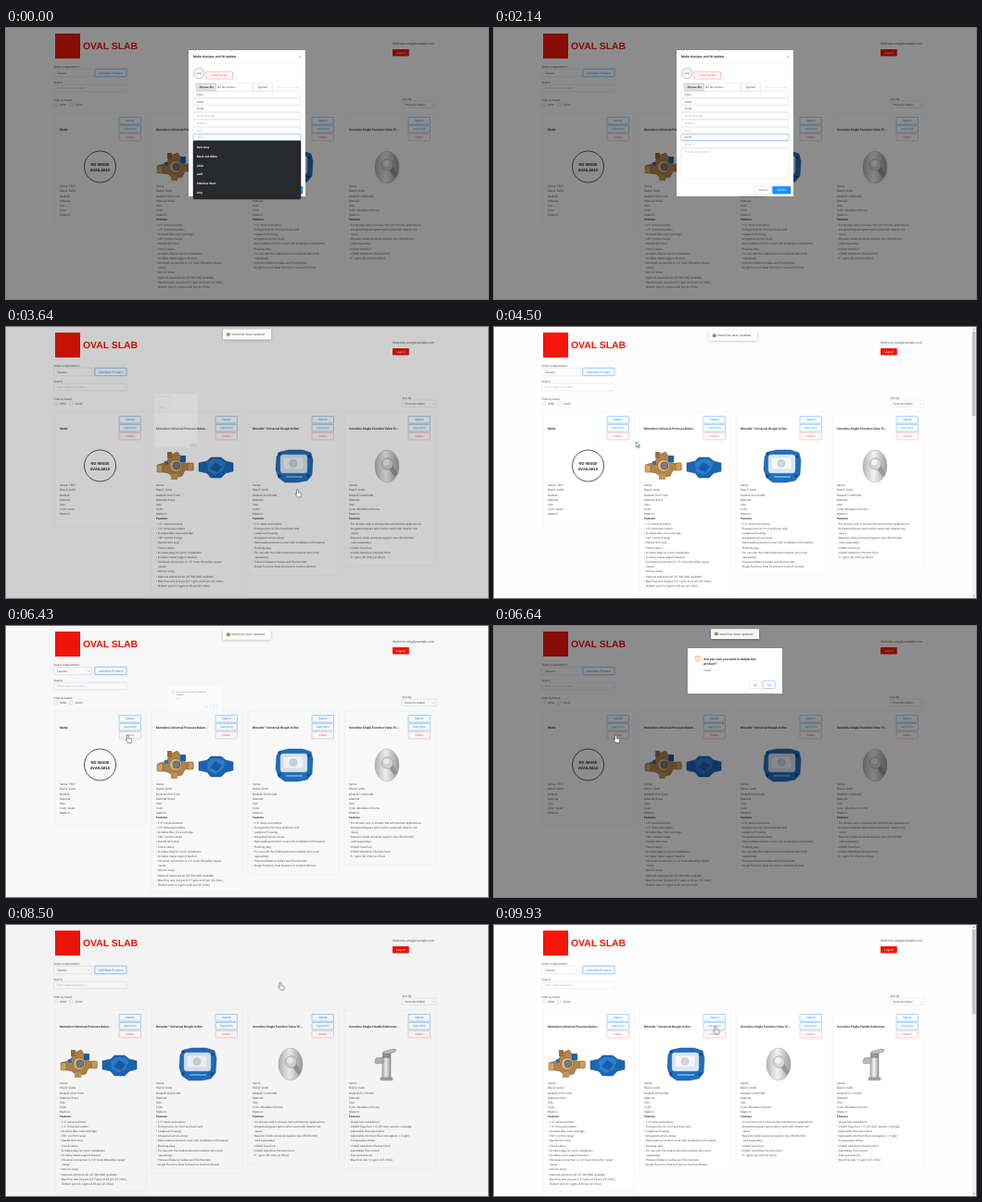
An HTML page for the animation above (10 s loop, 520 by 293 pixels).

```html
<!DOCTYPE html>
<html lang="en">
<head>
<meta charset="utf-8">
<title>Product admin</title>
<style>
html, body { margin: 0; width: 100%; height: 100%; overflow: hidden; background: #fff; }
svg { display: block; width: 100vw; height: 100vh; }
text { font: 3.05px Roboto, sans-serif; fill: #555; text-rendering: geometricPrecision; white-space: pre; }
.b { font-weight: 700; fill: #333; }
.m { font-size: 3.4px; }
.mid { text-anchor: middle; }
.hint { fill: #b5b5b5; }
.blue { fill: #1890ff; }
.red { fill: #ff4d4f; }
.white { fill: #fff; }
.logo { font: 700 10.4px "Liberation Sans", Arial, sans-serif; fill: #f5150a; }

.anim { animation: 10s linear infinite; }
.step { animation: 10s step-end infinite; }
.mask { animation-name: mask; }
.edit { animation-name: edit; transform-origin: 139.6px 100.5px; }
.confirm { animation-name: confirm; transform-origin: 127px 120px; }
.toast { animation-name: toast; }
.shift { animation-name: shift; }
.scroll { animation-name: scroll; }
.strip { animation-name: strip; }
.first { animation-name: first; }
.saved { animation-name: saved; }
.typed { animation-name: typed; }
.empty { animation-name: empty; }
.all { animation-name: all; }
.some { animation-name: some; }
.cursor { animation-name: cursor; }
.shown { animation-name: shown; }
.arrow { animation-name: arrow; }
.hand { animation-name: hand; }

@keyframes mask {
  0%, 35.24% { opacity: 1; } 37.24%, 64.18% { opacity: 0; }
  66.18%, 83.2% { opacity: 1; } 85.2%, 100% { opacity: 0; }
}
@keyframes edit {
  0%, 35.24% { opacity: 1; transform: scale(1); animation-timing-function: cubic-bezier(.78,.14,.15,.86); }
  37.24%, 100% { opacity: 0; transform: scale(.2); }
}
@keyframes confirm {
  0%, 64.18% { opacity: 0; transform: scale(.2); animation-timing-function: cubic-bezier(.08,.82,.17,1); }
  66.18%, 83.2% { opacity: 1; transform: scale(1); animation-timing-function: cubic-bezier(.78,.14,.15,.86); }
  85.2%, 100% { opacity: 0; transform: scale(.2); }
}
@keyframes toast {
  0%, 34.8% { opacity: 0; transform: translateY(-10px); animation-timing-function: ease-out; }
  37.1%, 66% { opacity: 1; transform: none; animation-timing-function: ease-in; }
  68%, 100% { opacity: 0; transform: translateY(-10px); }
}
@keyframes shift { 0% { transform: none; } 37.24% { transform: translateX(-2px); } 64.18%, 100% { transform: none; } }
@keyframes scroll { 0% { opacity: 0; } 37.24% { opacity: 1; } 64.18% { opacity: 0; } 85.2%, 100% { opacity: 1; } }
@keyframes strip { 0% { transform: none; } 82.9%, 100% { transform: translateX(-104px); } }
@keyframes first { 0% { opacity: 1; } 82.9%, 100% { opacity: 0; } }
@keyframes saved { 0% { opacity: 0; } 35.1%, 100% { opacity: 1; } }
@keyframes typed {
  0% { clip-path: inset(0 100% 0 0); } 2.1% { clip-path: inset(0 87% 0 0); }
  7.1% { clip-path: inset(0 67% 0 0); } 8.6% { clip-path: inset(0 47% 0 0); }
  10% { clip-path: inset(0 34% 0 0); } 12.1% { clip-path: inset(0 13% 0 0); }
  14.3%, 100% { clip-path: inset(0); }
}
@keyframes empty { 0% { opacity: 1; } 2.1%, 100% { opacity: 0; } }
@keyframes all { 0% { opacity: 1; } 7.1%, 100% { opacity: 0; } }
@keyframes some { 0% { opacity: 0; } 7.1% { opacity: 1; } 8.6%, 100% { opacity: 0; } }
@keyframes cursor {
  0%, 23.6% { transform: translate(264px,121px); animation-timing-function: ease-in-out; }
  33%, 37.3% { transform: translate(312px,175.5px); animation-timing-function: ease-in-out; }
  44.3%, 45% { transform: translate(153.5px,124px); animation-timing-function: ease-out; }
  48.6% { transform: translate(127px,113px); }
  52.1%, 66.4% { transform: translate(129px,118px); animation-timing-function: ease-in-out; }
  78.6%, 86% { transform: translate(293.5px,62px); animation-timing-function: ease-in-out; }
  93.6% { transform: translate(237px,102px); }
  97.1%, 100% { transform: translate(236.5px,109.5px); }
}
@keyframes shown { 0% { opacity: 0; } 23.6%, 100% { opacity: 1; } }
@keyframes arrow {
  0% { opacity: 1; } 32% { opacity: 0; } 37.5% { opacity: 1; } 46.5% { opacity: 0; }
  67% { opacity: 1; } 77.5% { opacity: 0; } 86.5% { opacity: 1; } 93%, 100% { opacity: 0; }
}
@keyframes hand {
  0% { opacity: 0; } 32% { opacity: 1; } 37.5% { opacity: 0; } 46.5% { opacity: 1; }
  67% { opacity: 0; } 77.5% { opacity: 1; } 86.5% { opacity: 0; } 93%, 100% { opacity: 1; }
}
</style>
</head>
<body>
<svg id="stage" viewBox="0 0 520 293" preserveAspectRatio="none"></svg>
<script>
const text = (x, y, s, cls = '') => `<text x="${x}" y="${y}" class="${cls}">${s}</text>`;
const rect = (x, y, w, h, fill, stroke = 'none', r = .6) =>
  `<rect x="${x}" y="${y}" width="${w}" height="${h}" rx="${r}" fill="${fill}" stroke="${stroke}" stroke-width=".5"/>`;
const path = (d, fill, stroke = 'none', width = .5) =>
  `<path d="${d}" fill="${fill}" stroke="${stroke}" stroke-width="${width}"/>`;
const circle = (x, y, r, fill, stroke = 'none', width = .5) =>
  `<circle cx="${x}" cy="${y}" r="${r}" fill="${fill}" stroke="${stroke}" stroke-width="${width}"/>`;
const group = (cls, ...parts) => `<g class="${cls}">${parts.join('')}</g>`;
const button = (x, y, w, h, label, color, cls, fill = '#fff') =>
  rect(x, y, w, h, fill, color) + text(x + w / 2, y + h / 2 + 1.15, label, 'mid ' + cls);
const chevron = (x, y) => path(`M${x} ${y}l1.3 1.3 1.3-1.3`, 'none', '#aaa', .4);

// Pictures use card-local coordinates, with the text edge at x = 0.
const noImage = circle(43.5, 150, 17, '#fff', '#444', .9) +
  text(43.5, 149.4, 'NO IMAGE', 'b mid" style="font-size:4.2px') +
  text(43.5, 154.9, 'AVAILABLE', 'b mid" style="font-size:4.2px');

const brassValve =
  path('M2 149l9-3 5-8 7-3 5 7 3 5 9 1v6l-9 1-3 6-9 2-6-5-11-2z', '#b3854a', '#765126') +
  rect(1, 149, 6, 8, '#d2a869', '#765126') + rect(34, 147, 6, 8, '#cda05f', '#765126') +
  rect(12, 135, 5, 7, '#9b7040') + rect(16, 159, 7, 6, '#c2955a') +
  circle(21, 150, 6.6, '#d9b379', '#7d5a30') + circle(22, 150, 4, '#777a80', '#44484d') +
  rect(26, 139, 6, 7, '#1762b4') + rect(9, 145, 4, 4, '#2a72bd') +
  path('M46 147l9-2 4-4h11l5 4 8 2v9l-8 2-5 5H59l-4-5-9-2z', '#1c66b5', '#124680') +
  path('M55 147l6-4h8l6 4-4 9-8 4-7-4z', '#2b7ecf') + path('M58 153l6-7 7 5-5 6z', '#1a5ba4');

const roughBox =
  path('M30 135l9-2h15l9 3 2 8-1 16-5 6-10 2H35l-7-5-3-9 1-14z', '#1f6fc1', '#134b8a') +
  rect(30, 138, 29, 20, '#dfe8ef', '#9db5cb', 3) + rect(33, 141, 22, 13, '#f5f8fa', '#c4d2de', 2) +
  circle(44, 147.5, 4, '#cbd8e3', '#a4b8c9') + path('M36 162h18', 'none', '#65a5df', 2) +
  [[29, 137], [61, 140], [29, 161], [60, 161]].map(([x, y]) => circle(x, y, 1.8, '#124a8c')).join('');

const valveTrim = `<ellipse cx="41" cy="150.5" rx="13" ry="17.5" fill="url(#chrome)" stroke="#a8a8a8" stroke-width=".5"/>` +
  path('M41 150l8 11 3-2-6-11z', '#999', '#777', .4) +
  circle(41.5, 148, 6.3, '#d6d6d6', '#8b8b8b') + circle(40.5, 146.5, 4, '#f1f1f1', '#b4b4b4');

const faucet =
  rect(36, 143, 9, 24, 'url(#chrome)', '#777', 1) + rect(34, 165, 13, 2.8, '#a5a5a5', '#777') +
  path('M37 143l-8 1-1 5 2 1 7-1z', '#b8b8b8', '#777') + rect(36.5, 138, 8.5, 5, '#999', '#666', 1) +
  path('M37 137l11-3 3 1-1 2-6 2h-7z', '#c4c4c4', '#777');

const specs = (model, material, color, series = '') =>
  ['Series: ' + series, 'Brand: Vuldo', 'Model# ' + model, 'Material: ' + material, 'Size:', 'Color: ' + color, 'Made In:'];

const products = [
  { title: 'Metal', picture: noImage, lines: specs('', '', '', 'TEST'), features: [], bottom: 215 },
  { title: 'Marnelow Universal Pressure Balan...', picture: brassValve, lines: specs('35 015 001', 'Brass', ''), bottom: 288,
    features: ['1/2" universal inlets', '1/2" Universal outlets', 'Includes Blue Core cartridge', '180° comfort range',
      'Handle limit stop', 'Check valves', 'Includes plug for 2 port installation', 'Includes metal support bracket',
      'Universal connection is 1/2" hose thread by copper', '~sweat', 'Service stops',
      'Optional extension kit (47 500 000) available', 'Max flow rate (top port) 5.7 gpm at 45 psi (19 l/min),',
      '~Bottom port) 6.3 gpm at 45 psi (22 l/min)'] },
  { title: 'Brinaldo™ Universal Rough-In Box', picture: roughBox, lines: specs('35 026 000', '', ''), bottom: 268,
    features: ['1/2" inlets and outlets', 'Fixing points for front and back wall', 'Leakproof housing',
      'Integrated service stops', 'Removable protection cover with installation information', 'Flushing plug',
      'For use with the Vuldo bathroom isolation kits (sold', '~separately)',
      'Pressure Balance Valves and Thermostats', 'Single Function, Dual Function or Custom Shower'] },
  { title: 'Sorvaline Single Function Valve Tri...', picture: valveTrim, lines: specs('19 860 000', '', 'MistGlow Chrome'), bottom: 258,
    features: ['For shower only or shower/tub with diverter applications', 'Integrated bypass option when used with diverter tub',
      '~spout', 'Requires Vuldo universal rough-in box (35 026 000', '~sold separately)', 'VULDO EaseTurn',
      'VULDO MistGlow Chrome finish', '5.1 gpm (20 l/min) at 45 psi'] },
  { title: 'Sorvaline Single-Handle Bathroom...', picture: faucet, lines: specs('23 170 00A', '', 'MistGlow Chrome'), bottom: 263,
    features: ['Single hole installation', 'VULDO EaseTurn 1.4" (35 mm) ceramic cartridge', 'Adjustable flow rate limiter',
      'Adjustable minimum flow rate approx. 1.0 gpm', 'Temperature limiter', 'VULDO MistGlow Chrome finish',
      'QuickWipe flow control', 'Pop-up waste set', 'Max flow rate 1.2 gpm (4.5 l/min)'] },
];

const card = ({ title, picture, lines, features, bottom }, i) => {
  const row = n => 172.2 + n * 5.18;
  const body = [
    rect(-5, 92, 98, bottom - 92, '#fff', '#ededed'),
    text(0, 110.8, title, 'b" style="font-size:3.3px'),
    button(64, 96.5, 23.5, 7.6, 'Update', '#40a9ff', 'blue'),
    button(64, 105.4, 23.5, 7.6, 'Copy Item', '#40a9ff', 'blue'),
    button(64, 114.3, 23.5, 7.6, 'Delete', '#ff9a96', 'red'),
    picture,
    ...lines.map((s, n) => text(0, row(n), s)),
  ];
  if (i === 0) body.push(group('step saved', text(8.7, row(5), 'tester')));
  if (features.length) body.push(text(0, row(7), 'Features', 'b'));
  features.forEach((s, n) => body.push(text(0, row(8 + n), s[0] === '~' ? '   ' + s.slice(1) : '• ' + s)));
  return `<g transform="translate(${58 + i * 104})">${group(i ? '' : 'step first', ...body)}</g>`;
};

const header = [
  rect(53, 6, 27, 27, '#f5150a', 'none', 0), text(83, 23.3, 'OVAL SLAB', 'logo'),
  text(51.5, 43, 'Select a department:'), rect(51.5, 44.3, 41.5, 8.4, '#fff', '#d9d9d9'),
  text(55, 49.7, 'Faucets'), chevron(87.5, 48),
  button(95.8, 44.3, 34.2, 8.4, 'Add New Product', '#1890ff', 'm blue'),
  text(51.5, 60, 'Search'), rect(51.5, 61.2, 78.5, 7.6, '#fff', '#d9d9d9'),
  text(55, 66.1, 'Enter name or product', 'hint'),
  text(51.5, 78.6, 'Filter by brand:'),
  rect(52, 81, 3.6, 3.6, '#fff', '#ccc'), text(58, 84, 'Odrel'),
  rect(68.6, 81, 3.6, 3.6, '#fff', '#ccc'), text(74.6, 84, 'Vuldo'),
  text(417, 17.6, 'Welcome amy@example.com', 'm'),
  button(417, 23, 17.8, 7.4, 'Logout', 'none', 'white', '#f5150a'),
  text(427.5, 77.8, 'Sort By:'), rect(427.5, 79, 36.5, 7.4, '#fff', '#d9d9d9'),
  text(430.5, 83.8, 'Recently Added'), chevron(459.4, 82.2),
];

const fieldPitch = 7.7;
const fields = ['input', 'Vuldo', 'metal', 'Model Number', 'Material', 'Size', '', 'Made in'];
const dropdown = (cls, items) => group('step ' + cls,
  rect(202, 122, 116, items.length * 9.75 + 4.5, '#292a2d', '#1f2023', 1),
  ...items.map((s, i) => text(205.8, 130.2 + i * 9.75, s, 'b white')));

const editDialog = group('anim edit',
  rect(197, 24, 126, 158, '#fff'),
  text(202, 32.2, 'Make changes and hit update.', 'b" style="font-size:3.5px'),
  path('M315.8 29.9l2.2 2.2m0-2.2l-2.2 2.2', 'none', '#888', .4),
  path('M197 38h126M197 168h126', 'none', '#eee'),
  circle(208.3, 49, 5.6, '#fff', '#777'), text(208.3, 50.1, 'N/A', 'mid'),
  button(216, 47.3, 28.5, 7.7, 'Delete image', '#ff7875', 'red'),
  rect(205, 59.6, 60.5, 8.6, '#fff', '#ddd'),
  button(205.8, 60.3, 20.6, 7.1, 'Choose file', '#aaa', 'b', '#e6e6e6'), text(228, 65, 'No file chosen'),
  button(266.5, 59.6, 21, 8.6, 'Upload', '#ddd', '', '#fafafa'),
  path('M290 64.4h25', 'none', '#ddd'), chevron(312.6, 63.8),
  ...fields.map((s, i) => rect(202, 69 + i * fieldPitch - .4, 116, 6.7, '#fff', i === 6 ? '#40a9ff' : '#d9d9d9') +
    text(205.5, 73 + i * fieldPitch, s, i < 3 ? '' : 'hint')),
  group('step empty', text(205.5, 119.2, 'Color', 'hint')),
  group('step typed', text(205.5, 119.2, 'tester')),
  rect(202, 130.2, 116, 32, '#fff', '#d9d9d9'), text(205.5, 134.7, 'Product Description', 'hint'),
  path('M315.5 161.4l1.8-1.8', 'none', '#999', .3),
  button(280.5, 171.2, 18.5, 8, 'Cancel', '#d9d9d9', ''),
  button(300.5, 171.2, 19.5, 8, 'Update', '#1890ff', 'white', '#1890ff'),
  dropdown('all', ['Dark Grey', 'Black and White', 'white', 'asdf', 'Stainless Steel', 'Grey']),
  dropdown('some', ['Black and White', 'white', 'Stainless Steel']));

const confirmDialog = group('anim confirm',
  rect(209, 24, 102, 49, '#fff'),
  circle(220, 35.3, 2.8, 'none', '#fa7a3c', .6), path('M220 33.6v2m0 .7v.7', 'none', '#fa7a3c', .6),
  text(226.3, 36.6, 'Are you sure you want to <tspan>delete this</tspan>', 'b" style="font-size:3.5px'),
  text(226.3, 42, 'product?', 'b" style="font-size:3.5px'),
  text(226.3, 49, 'metal', ''),
  button(275.8, 59.3, 13, 8.2, 'No', '#d9d9d9', ''),
  button(290.2, 59.3, 13, 8.2, 'Yes', '#40a9ff', 'blue'));

const toast = group('step shift', group('anim toast',
  `<g filter="url(#shadow)">${rect(234, 3.8, 52, 10.8, '#fff')}</g>`,
  circle(239.8, 9.2, 2, '#5c9a32'), path('M238.9 9.2l.7.7 1.2-1.4', 'none', '#fff', .4),
  text(243, 10.3, 'metal has been updated', 'm')));

const cursor = group('step shown', group('anim cursor',
  group('step arrow', path('M0 0v6l1.4-1.3 1 2.2 1-.4-1-2.2h1.9z', '#fff', '#222', .5)),
  group('step hand', path('M2.4 0q1 0 1 1v2.5l2.4.5q1 .3.9 1.4l-.6 2.9H2.6L.3 5.5q-.4-1 .7-.8l.5.4V1q0-1 .9-1z', '#fff', '#222', .5))));

document.getElementById('stage').innerHTML = `
  <defs>
    <linearGradient id="chrome"><stop stop-color="#b5b5b5"/><stop offset=".45" stop-color="#f3f3f3"/><stop offset="1" stop-color="#9c9c9c"/></linearGradient>
    <filter id="shadow" x="-20%" y="-50%" width="140%" height="220%"><feDropShadow dx="0" dy="1" stdDeviation="1.4" flood-opacity=".25"/></filter>
    <clipPath id="columns"><rect x="51" y="90" width="414" height="203"/></clipPath>
  </defs>
  <rect width="520" height="293" fill="#fefefe"/>
  ${header.join('')}
  <g clip-path="url(#columns)">${group('step strip', ...products.map(card))}</g>
  ${group('step scroll', rect(515.5, 0, 4.5, 293, '#f1f1f1', 'none', 0), rect(516, 5, 3.5, 91, '#c1c1c1', 'none', 0),
    path('M516.8 3l1-1.2 1 1.2zM516.8 290l1 1.2 1-1.2z', '#777'))}
  <rect class="anim mask" width="520" height="293" fill="#000" fill-opacity=".45"/>
  ${editDialog}${confirmDialog}${toast}${cursor}`;
</script>
</body>
</html>
```
